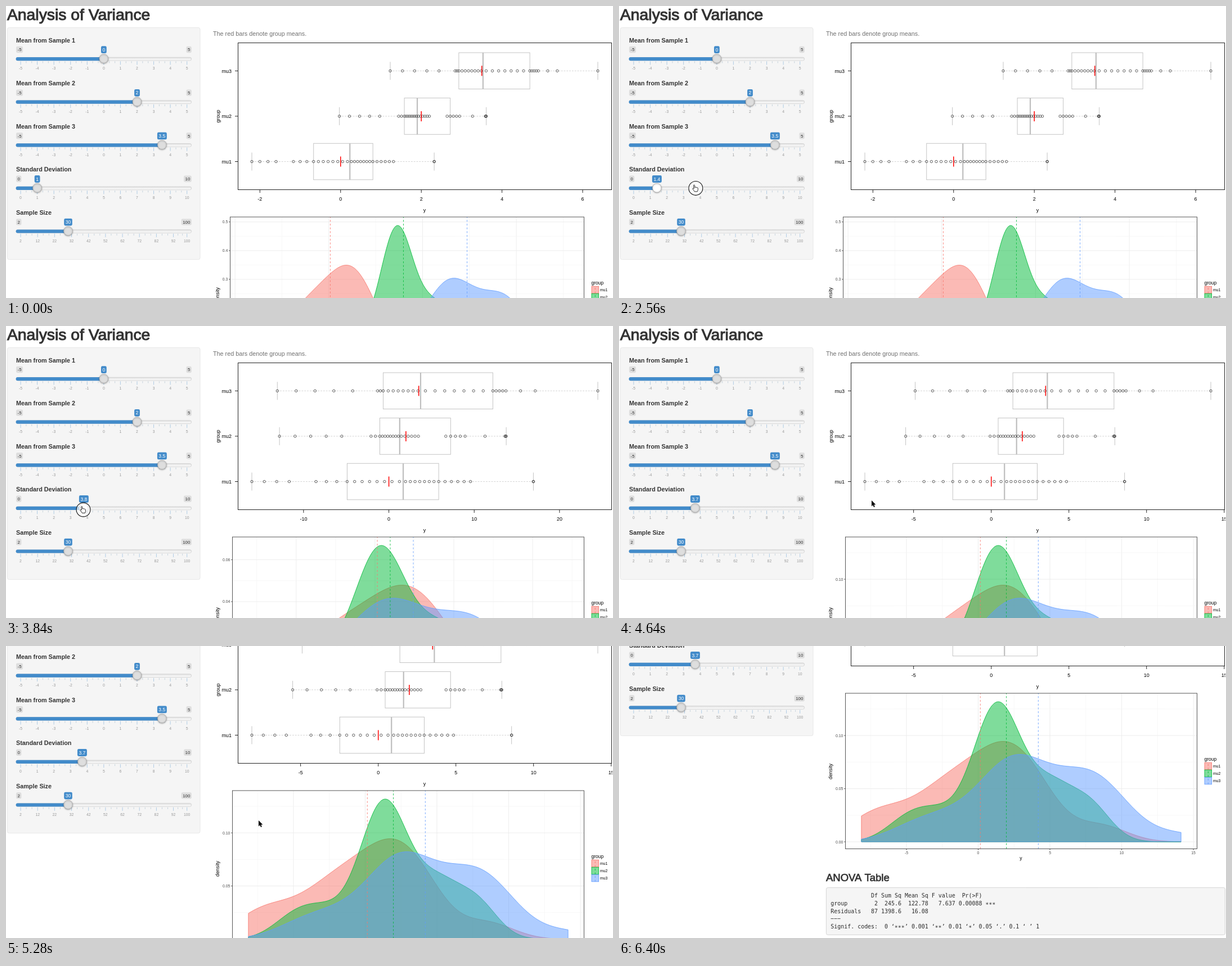
These frames come from a looping animation (1079 px wide and 519 px high, 7040 ms). An HTML page with a canvas:

```html
<!DOCTYPE html>
<html lang="en">
<head>
<meta charset="utf-8">
<title>Analysis of Variance</title>
<style>
  html, body { margin: 0; width: 100%; height: 100%; overflow: hidden; background: #fff; }
  canvas { display: block; width: 1079px; height: 519px; }
</style>
</head>
<body>
<canvas id="stage"></canvas>
<script>
const W = 1079, H = 519, LOOP = 7040, STEP = 160, COUNT = 30;
const SANS = '"Liberation Sans", Arial, sans-serif';
const MONO = '"DejaVu Sans Mono", monospace';
const canvas = document.getElementById('stage');
const ctx = canvas.getContext('2d');
const dpr = window.devicePixelRatio || 1;
canvas.width = W * dpr;
canvas.height = H * dpr;

// Quantile curves: rank in the sorted sample -> hundredths of a standard deviation from the mean.
const groups = [
  { name: 'mu1', mean: 0, shift: .04, bw: .485, color: '#F8766D',
    curve: [[0, -220], [3, -160], [4, -117], [7, -67], [14.5, 23], [22, 80], [27, 131], [28, 232], [29, 232]] },
  { name: 'mu2', mean: 2, shift: -.01, bw: .383, color: '#00BA38',
    curve: [[0, -203], [4, -103], [5, -56], [7, -42], [14.5, -10], [20, 20], [21, 64], [25, 95], [27, 159], [29, 161]] },
  { name: 'mu3', mean: 3.5, shift: .186, bw: .535, color: '#619CFF',
    curve: [[0, -227], [4, -106], [5, -66], [7, -57], [14.5, 3], [22, 119], [26, 140], [28, 187], [29, 287.5]] }
];

const plots = [
  { from: 0, sd: 1, boxStep: 2, xStep: 2.5, yStep: .1, digits: 1 },
  { from: 3680, sd: 7.3, boxStep: 10, xStep: 10, yStep: .02, digits: 2 },
  { from: 4640, sd: 3.7, boxStep: 5, xStep: 5, yStep: .05, digits: 2 }
];

const sliders = [
  ...groups.map((g, i) => ({ label: `Mean from Sample ${i + 1}`, min: -5, max: 5, step: 1, value: g.mean })),
  { label: 'Standard Deviation', min: 0, max: 10, step: 1, live: true },
  { label: 'Sample Size', min: 2, max: 100, step: 10, value: COUNT }
];

const arrowShape = new Path2D('M0 0v10.5l2.4-2.2 1.6 3.7 1.8-.8-1.6-3.6h3.2z');
const handShape = new Path2D('M-3.9-4.8c0-1.6 2-1.6 2.1 0l.3 3.4c.3-.9 1.8-.9 2 .2c.5-.7 1.7-.5 1.9.4' +
  'c.6-.5 1.6-.1 1.6.9c.1 2.2-.2 3.6-1.1 5.8h-5c-.9-1.8-2.2-3-3.2-4.6c-.6-1 .6-2 1.6-1.2l.6.6z');

function ease(t, from, to) {
  const p = Math.min(1, Math.max(0, (t - from) / (to - from)));
  return p * p * (3 - 2 * p);
}

function quantile(g, rank) {
  const i = Math.max(1, g.curve.findIndex(k => k[0] >= rank));
  const [r0, v0] = g.curve[i - 1], [r1, v1] = g.curve[i];
  return (v0 + (v1 - v0) * (rank - r0) / (r1 - r0)) / 100;
}
for (const g of groups) g.data = Array.from({ length: COUNT }, (_, i) => quantile(g, i));

const sdAt = t => 1 + 6.3 * ease(t, 2400, 3440) - 3.6 * ease(t, 3360, 3880);
const scrollAt = t => 306 / (1 + Math.exp((5311 - t) / 67)) - 15 * ease(t, 5760, 6400);

function cursorAt(t) {
  const enter = ease(t, 160, 1200), drag = ease(t, 2400, 2750);
  const back = ease(t, 3360, 3800), leave = ease(t, 4000, 4480);
  return [630 - 576 * enter + 189 * drag - 105.5 * back + 311.5 * leave,
    496 - 174 * enter + 4.5 * drag - 16.5 * leave];
}

// Value range shared by all groups at the given spread.
function extent(sd) {
  const [a, , c] = groups;
  return [a.mean + a.data[0] * sd, c.mean + c.data[COUNT - 1] * sd];
}

function text(str, x, y, size, color, align = 'left', font = SANS, weight = '') {
  ctx.font = `${weight} ${size}px ${font}`;
  ctx.fillStyle = color;
  ctx.textAlign = align;
  ctx.fillText(str, x, y);
}

function heading(str, x, y, size) {
  text(str, x, y, size, '#333');
  ctx.strokeStyle = '#333';
  ctx.lineWidth = size * .038;
  ctx.strokeText(str, x, y);
}

function sideways(str, x, y, size) {
  ctx.save();
  ctx.translate(x, y);
  ctx.rotate(-Math.PI / 2);
  text(str, 0, 0, size, '#000', 'center');
  ctx.restore();
}

function line(x1, y1, x2, y2, color, width = 1, dash = []) {
  ctx.setLineDash(dash);
  ctx.strokeStyle = color;
  ctx.lineWidth = width;
  ctx.beginPath();
  ctx.moveTo(x1, y1);
  ctx.lineTo(x2, y2);
  ctx.stroke();
  ctx.setLineDash([]);
}

function frame(x, y, w, h, color, width = 1) {
  ctx.strokeStyle = color;
  ctx.lineWidth = width;
  ctx.strokeRect(x, y, w, h);
}

function rounded(x, y, w, h, r, fill, stroke) {
  ctx.beginPath();
  ctx.roundRect(x, y, w, h, r);
  ctx.fillStyle = fill;
  ctx.fill();
  if (stroke) {
    ctx.strokeStyle = stroke;
    ctx.lineWidth = .8;
    ctx.stroke();
  }
}

function disc(x, y, r, fill, stroke, width = 1) {
  ctx.beginPath();
  ctx.arc(x, y, r, 0, 7);
  if (fill) { ctx.fillStyle = fill; ctx.fill(); }
  ctx.strokeStyle = stroke;
  ctx.lineWidth = width;
  ctx.stroke();
}

// A rounded label; anchor 0, .5 or 1 puts x at its left, middle or right.
function badge(str, x, y, anchor, size, height, fill, color) {
  ctx.font = `${size}px ${SANS}`;
  const w = ctx.measureText(str).width + 5;
  rounded(x - w * anchor, y - height / 2, w, height, 2.4, fill);
  text(str, x + w * (.5 - anchor), y + size * .36, size, color, 'center');
}

function drawSlider(s, y, value, active) {
  const x = v => 26 + (v - s.min) / (s.max - s.min) * 295.7;
  const hx = x(value), ty = y + 33.4;
  text(s.label, 18, y + 4, 10.8, '#333', 'left', SANS, 'bold');
  badge(String(s.min), 18, y + 17, 0, 7.9, 11.4, '#dedede', '#333');
  badge(String(s.max), 329.8, y + 17, 1, 7.9, 11.4, '#dedede', '#333');
  badge(String(value), hx, y + 17.2, .5, 8.6, 12.8, '#428bca', '#fff');

  const shade = ctx.createLinearGradient(0, ty - 3, 0, ty + 3);
  shade.addColorStop(0, '#dedede');
  shade.addColorStop(1, '#fff');
  rounded(18, ty - 2.6, 311.6, 5.6, 2.8, shade, '#ccc');
  rounded(17.6, ty - 2.9, hx - 17.6, 6.2, 3, '#428bca');

  for (let v = s.min; ; v = Math.min(v + s.step, s.max)) {
    const px = x(v), next = x(Math.min(v + s.step, s.max));
    line(px, y + 37.8, px, y + 44, '#9dc1e0', .8);
    text(v, px, y + 52.8, 6.8, '#999', 'center');
    if (v >= s.max) break;
    for (let k = 1; k < 3; k++) {
      const mx = px + (next - px) * k / 3;
      line(mx, y + 37.8, mx, y + 41, '#b9c9d6', .8);
    }
  }

  ctx.save();
  ctx.shadowColor = 'rgba(0,0,0,.3)';
  ctx.shadowBlur = 2.5 * dpr;
  ctx.shadowOffsetY = .8 * dpr;
  disc(hx, ty - .3, 7.9, active ? '#fff' : '#dedede', '#ababab', .8);
  ctx.restore();
}

function drawSidebar(t) {
  rounded(2.4, 38.4, 342.6, 412.2, 3.2, '#f5f5f5', '#e3e3e3');
  const sd = Math.round(sdAt(t) * 10) / 10;
  sliders.forEach((s, i) =>
    drawSlider(s, 60.5 + 76.6 * i, s.live ? sd : s.value, s.live && t >= 1280 && t < 4160));
}

function drawBoxplot(p) {
  const grey = '#bebebe', [lo, hi] = extent(p.sd);
  const unit = 615 / (hi - lo), px = v => 437 + (v - lo) * unit;
  ctx.save();
  ctx.beginPath();
  ctx.rect(360, 0, 718, 900);
  ctx.clip();
  frame(412.5, 65.5, 664, 261, '#222');
  sideways('group', 380, 196, 9);
  for (let v = -2 * p.boxStep; px(v) < 1077; v += p.boxStep) {
    if (px(v) < 413) continue;
    line(px(v), 326.5, px(v), 332, '#222');
    text(v, px(v), 346.3, 9, '#000', 'center');
  }
  text('y', 744, 366, 9, '#000', 'center');

  groups.forEach((g, i) => {
    const y = 276.5 - 80.6 * i, mid = px(g.mean);
    const at = rank => px(g.mean + quantile(g, rank) * p.sd);
    const [min, q1, median, q3, max] = [0, 7, 14.5, 22, 29].map(at);
    line(407, y, 412.5, y, '#222');
    text(g.name, 401, y + 3.2, 9, '#000', 'right');
    for (const [end, side] of [[min, q1], [max, q3]]) {
      line(end, y, side, y, '#c8c8c8', .8, [2.8, 2]);
      line(end, y - 16, end, y + 16, grey, .9);
    }
    frame(q1, y - 32.3, q3 - q1, 64.6, grey, .9);
    line(median, y - 32.3, median, y + 32.3, grey, 2.2);
    g.data.forEach((_, rank) => disc(at(rank), y, 2.2, null, '#222', .7));
    line(mid, y - 9, mid, y + 9, '#f00', 1.5);
  });
  ctx.restore();
}

function kde(g, z) {
  const sum = g.data.reduce((s, d) => s + Math.exp(-.5 * ((z - d) / g.bw) ** 2), 0);
  return sum / (COUNT * g.bw * Math.sqrt(2 * Math.PI));
}

function gridLines(start, end, step, draw) {
  for (let k = Math.ceil(start / step * 2); k <= end / step * 2; k++) {
    const major = k % 2 === 0;
    draw(k * step / 2, major, major ? '#ebebeb' : '#f3f3f3', major ? .9 : .6);
  }
}

function drawDensity(p) {
  const left = 394.5 + 4 * p.digits, right = 1027.5, top = 375, bottom = 651.5;
  const base = 639, height = 510.5, small = '#4d4d4d', dash = [3.35, 3.35];
  const [lo, hi] = extent(p.sd);
  const unit = (right - left) / ((hi - lo) * 1.1);
  const zero = left - (lo - (hi - lo) * .05) * unit;
  const px = v => zero + v * unit;

  gridLines((left - zero) / unit, (right - zero) / unit, p.xStep, (v, major, color, width) => {
    line(px(v), top, px(v), bottom, color, width);
    if (!major) return;
    line(px(v), bottom, px(v), bottom + 2.4, '#333', .8);
    text(v, px(v), 660.8, 6.9, small, 'center');
  });
  gridLines(0, .5175 / p.sd, p.yStep, (v, major, color, width) => {
    const y = base - v * p.sd * height;
    line(left, y, right, y, color, width);
    if (!major) return;
    line(left - 2.4, y, left, y, '#333', .8);
    text(v.toFixed(p.digits), left - 4.2, y + 2.5, 6.9, small, 'right');
  });

  for (const g of groups) {
    ctx.beginPath();
    ctx.moveTo(px(lo), base);
    for (let i = 0; i <= 280; i++) {
      const v = lo + (hi - lo) * i / 280;
      ctx.lineTo(px(v), base - kde(g, (v - g.mean) / p.sd) * height);
    }
    ctx.lineTo(px(hi), base);
    ctx.closePath();
    ctx.globalAlpha = .5;
    ctx.fillStyle = g.color;
    ctx.fill();
    ctx.globalAlpha = 1;
    ctx.strokeStyle = g.color;
    ctx.lineWidth = .84;
    ctx.stroke();
  }
  for (const g of groups) {
    const x = px(g.mean + g.shift * p.sd);
    line(x, bottom, x, top, g.color, .84, dash);
  }
  frame(left, top, right - left, bottom - top, '#444', .9);
  text('y', 714.5, 671, 8.6, '#000', 'center');
  sideways('density', 379, 514, 8.9);

  text('group', 1040.5, 494.5, 8.5, '#000');
  groups.forEach((g, i) => {
    const y = 498.2 + 13 * i;
    ctx.globalAlpha = .5;
    ctx.fillStyle = g.color;
    ctx.fillRect(1041, y, 12.6, 12.6);
    ctx.globalAlpha = 1;
    frame(1041, y, 12.6, 12.6, g.color, .84);
    line(1047.3, y + 12.6, 1047.3, y, g.color, .84, dash);
    text(g.name, 1056, y + 8.8, 6.8, '#000');
  });
}

function drawTable() {
  heading('ANOVA Table', 368, 709.3, 18.5);
  rounded(368.4, 720.4, 709, 84, 3, '#f5f5f5', '#ccc');
  [
    '            Df Sum Sq Mean Sq F value  Pr(>F)',
    'group        2  245.6  122.78   7.637 0.00088 ∗∗∗',
    'Residuals   87 1398.6   16.08',
    '−−−',
    'Signif. codes:  0 ‘∗∗∗’ 0.001 ‘∗∗’ 0.01 ‘∗’ 0.05 ‘.’ 0.1 ‘ ’ 1'
  ].forEach((row, i) => text(row, 376.3, 738 + 13.8 * i, 9.95, '#2b2b2b', 'left', MONO));
}

function drawCursor(t) {
  if (t < 160 || t >= 6400) return;
  ctx.save();
  ctx.translate(...cursorAt(t));
  if (t >= 1280 && t < 4160) {
    if (t >= 1600 && t < 4000) disc(0, 0, 12.4, 'rgba(255,255,255,.65)', '#111', 1.1);
    ctx.fillStyle = '#fff';
    ctx.fill(handShape);
    ctx.strokeStyle = '#111';
    ctx.lineWidth = .9;
    ctx.stroke(handShape);
  } else {
    ctx.strokeStyle = '#fff';
    ctx.lineWidth = 1.6;
    ctx.stroke(arrowShape);
    ctx.fillStyle = '#000';
    ctx.fill(arrowShape);
  }
  ctx.restore();
}

function draw(t) {
  ctx.setTransform(dpr, 0, 0, dpr, 0, 0);
  ctx.fillStyle = '#fff';
  ctx.fillRect(0, 0, W, H);
  ctx.save();
  ctx.translate(0, -Math.round(scrollAt(t)));
  const plot = plots.filter(p => t >= p.from).pop();
  heading('Analysis of Variance', 2, 25.3, 28.3);
  drawSidebar(t);
  text('The red bars denote group means.', 368, 53, 10.8, '#707070');
  drawBoxplot(plot);
  drawDensity(plot);
  drawTable();
  ctx.restore();
  drawCursor(t);
}

const start = performance.now();
let last = -1;
function tick() {
  const t = Math.floor((performance.now() - start) % LOOP / STEP) * STEP;
  if (t !== last) draw(last = t);
  requestAnimationFrame(tick);
}
tick();
</script>
</body>
</html>
```
